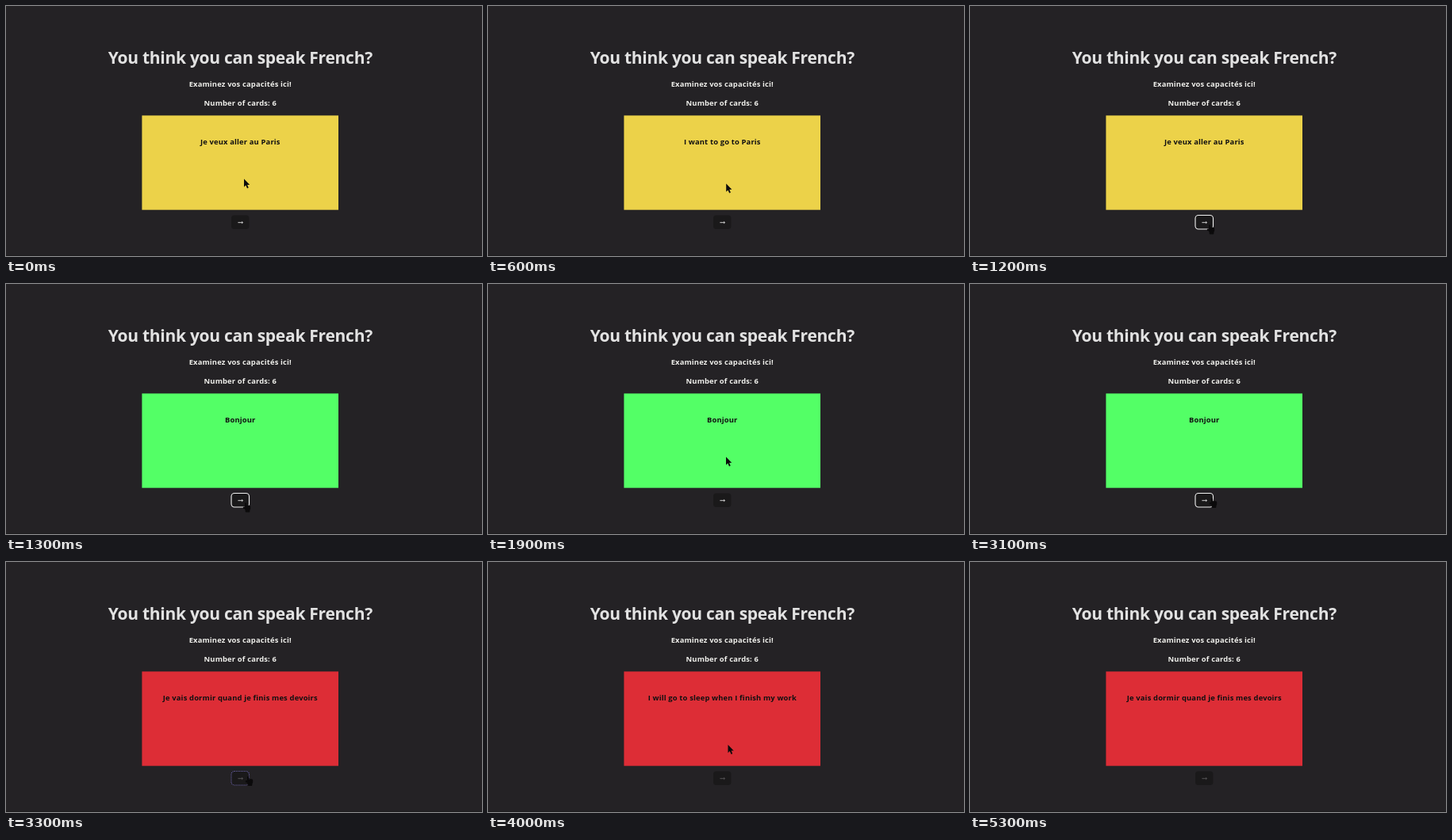
An HTML page with a canvas that plays this animation: 600x316 px, repeating every 5.4 s.

```html
<!DOCTYPE html>
<html lang="en">
<head>
<meta charset="utf-8">
<title>Flash cards</title>
<style>
  html, body { margin: 0; width: 100%; height: 100%; overflow: hidden; background: #242225; }
  canvas { display: block; width: 600px; height: 316px; }
</style>
</head>
<body>
<canvas id="stage"></canvas>
<script>
const W = 600, H = 316, LOOP = 5400, STEP = 100, CENTER = 295.3;
const FONT = '"Open Sans", "Noto Sans", sans-serif';
const canvas = document.getElementById('stage');
const ctx = canvas.getContext('2d');
const ratio = window.devicePixelRatio || 1;
canvas.width = W * ratio;
canvas.height = H * ratio;
ctx.scale(ratio, ratio);

const YELLOW = '#ecd249', GREEN = '#53ff66', RED = '#dd2d36';

// Each entry holds from its time until the next one.
const cards = [
  { at: 0, color: YELLOW, text: 'Je veux aller au Paris' },
  { at: 100, color: YELLOW, text: 'I want to go to Paris' },
  { at: 1100, color: YELLOW, text: 'Je veux aller au Paris' },
  { at: 1300, color: GREEN, text: 'Bonjour' },
  { at: 2200, color: GREEN, text: 'Hello' },
  { at: 3100, color: GREEN, text: 'Bonjour' },
  { at: 3300, color: RED, text: 'Je vais dormir quand je finis mes devoirs' },
  { at: 3900, color: RED, text: 'I will go to sleep when I finish my work' },
  { at: 4400, color: RED, text: 'Je vais dormir quand je finis mes devoirs' }
];

// Cursor stops; it rests between equal neighbours.
const stops = [
  { at: 0, x: 300, y: 218.5 },
  { at: 500, x: 300, y: 218.5 },
  { at: 1000, x: 302, y: 276.5 },
  { at: 1500, x: 302, y: 276.5 },
  { at: 1900, x: 300, y: 218.5 },
  { at: 2400, x: 300, y: 218.5 },
  { at: 2900, x: 305, y: 271 },
  { at: 3300, x: 305, y: 271 },
  { at: 3600, x: 302.5, y: 231 },
  { at: 4400, x: 302.5, y: 231 },
  { at: 4700, x: 268, y: 168 }
];
const HIDE_AT = 4600;

const smooth = p => p * p * (3 - 2 * p);
const latest = (list, t) => list.filter(item => item.at <= t).pop();

function cursorAt(t) {
  const from = latest(stops, t);
  const to = stops[stops.indexOf(from) + 1] || from;
  const p = to === from ? 0 : smooth((t - from.at) / (to.at - from.at));
  return { x: from.x + (to.x - from.x) * p, y: from.y + (to.y - from.y) * p };
}

function label(text, y, size, color, spacing) {
  ctx.font = `700 ${size}px ${FONT}`;
  ctx.letterSpacing = spacing + 'px';
  ctx.textAlign = 'center';
  ctx.fillStyle = color;
  ctx.fillText(text, CENTER, y);
}

const smallLabel = (text, y, color) => label(text, y, 9.4, color, 0.16);

function drawButton(hover, dim) {
  ctx.beginPath();
  ctx.roundRect(284, 264.5, 22.5, 17.5, 4);
  ctx.fillStyle = '#1a191a';
  ctx.fill();
  if (hover) {
    ctx.lineWidth = 1.1;
    ctx.strokeStyle = dim ? '#6a62a8' : '#f2f2f2';
    ctx.setLineDash(dim ? [1, 1] : []);
    ctx.stroke();
    ctx.setLineDash([]);
  }
  ctx.strokeStyle = dim ? '#5c5a5c' : '#e6e6e6';
  ctx.lineWidth = 0.9;
  ctx.beginPath();
  ctx.moveTo(292.4, 273.7);
  ctx.lineTo(298.4, 273.7);
  ctx.moveTo(297.2, 272.5);
  ctx.lineTo(298.5, 273.7);
  ctx.lineTo(297.2, 274.9);
  ctx.stroke();
}

function drawArrow() {
  ctx.beginPath();
  [[0, 0], [0, 10.2], [2.3, 8.1], [4, 12], [5.7, 11.2], [4.1, 7.5], [7.2, 7.4]]
    .forEach(([x, y]) => ctx.lineTo(x, y));
  ctx.closePath();
  ctx.fill();
}

function drawHand() {
  ctx.beginPath();
  ctx.roundRect(-1, 0, 2.2, 7, 1);
  ctx.roundRect(-1.2, 3.2, 7.4, 6.2, 1.8);
  ctx.roundRect(-3.2, 5, 4.4, 2.8, 1.2);
  ctx.roundRect(-0.4, 6, 5.8, 6, 1.2);
  ctx.fill();
}

function drawCursor({ x, y }, hover) {
  ctx.save();
  ctx.translate(x, y);
  ctx.fillStyle = '#0b0a0b';
  hover ? drawHand() : drawArrow();
  ctx.restore();
}

function draw(t) {
  const card = latest(cards, t);
  const cursor = cursorAt(t);
  const hover = cursor.y > 264;

  ctx.fillStyle = '#242225';
  ctx.fillRect(0, 0, W, H);
  ctx.fillStyle = '#1d1c1d';
  ctx.fillRect(0, H - 1, W, 1);

  label('You think you can speak French?', 73.3, 21, '#e2e2e2', -0.27);
  smallLabel('Examinez vos capacités ici!', 102.3, '#f0f0ec');
  smallLabel('Number of cards: 6', 126.4, '#f0f0ec');

  ctx.fillStyle = card.color;
  ctx.fillRect(171.4, 138.4, 247.6, 119.3);
  smallLabel(card.text, 175.4, '#111011');

  drawButton(hover, card.color === RED);
  if (t < HIDE_AT) drawCursor(cursor, hover);
}

function tick() {
  const t = performance.now() % LOOP;
  draw(Math.floor(t / STEP) * STEP);
  requestAnimationFrame(tick);
}
tick();
</script>
</body>
</html>
```
